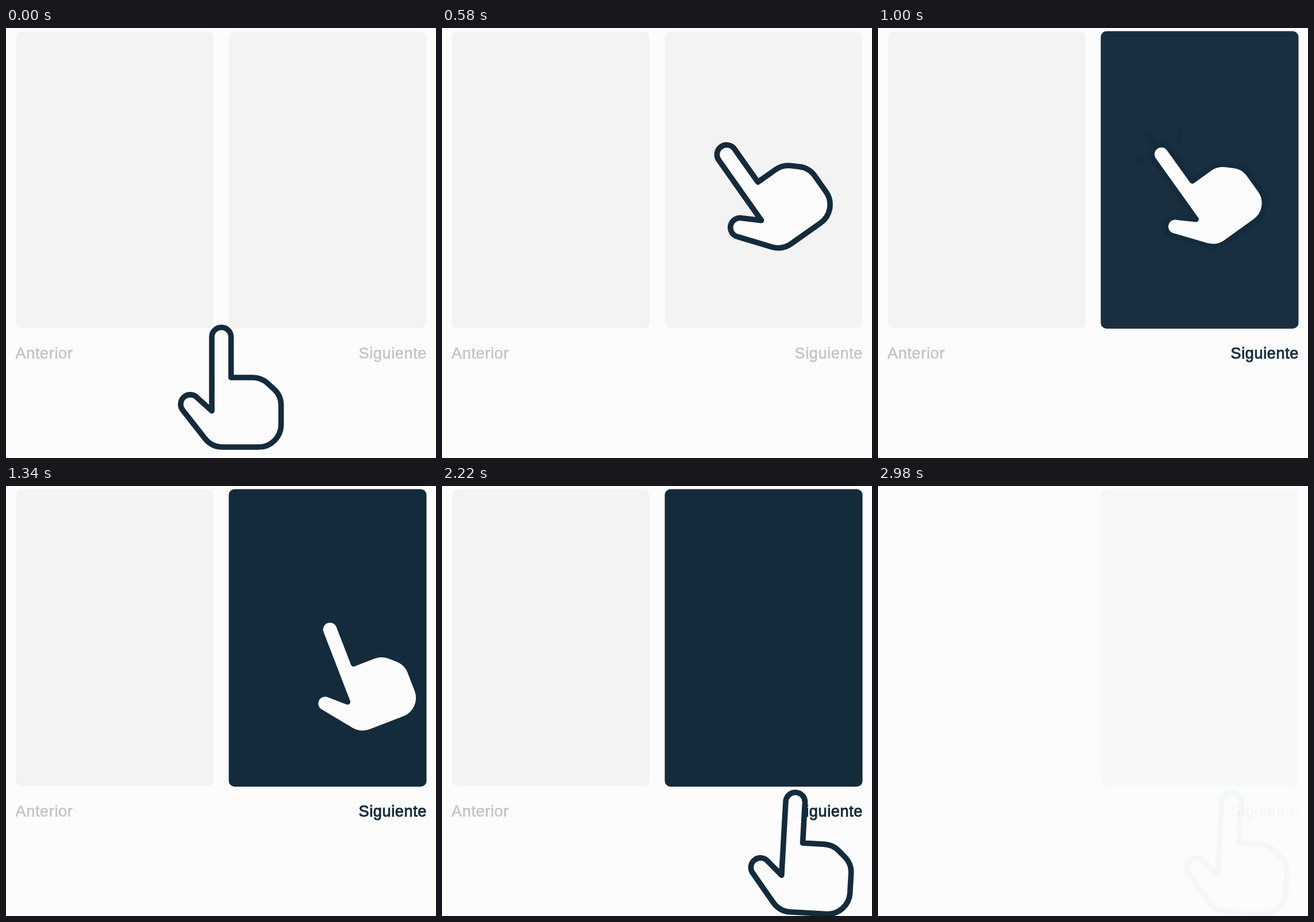
An HTML page that plays this animation: 748 px wide and 748 px high, repeating every 3.14 s.

```html
<!DOCTYPE html>
<html lang="es">
<head>
<meta charset="utf-8">
<title>Anterior / Siguiente</title>
<style>
  html, body { margin: 0; height: 100%; overflow: hidden; background: #fcfcfc; }
  svg { display: block; width: 100%; height: 100%; }
  text { font: 27px "Liberation Sans", Arial, sans-serif; letter-spacing: .65px; stroke: currentColor; stroke-width: .6; }
  text.dark { stroke-width: 1; }
  .light { fill: #f3f3f3; }
  .muted { color: #c4c4c4; fill: currentColor; }
  .dark { color: #142b3b; fill: currentColor; }
  #hand { fill: #fcfcfc; stroke: #142b3b; stroke-width: 9.6; stroke-linecap: round; stroke-linejoin: round; }
</style>
</head>
<body>
<svg viewBox="0 0 748 748">
  <rect class="light fades" x="17" y="6" width="344" height="516" rx="10"/>
  <rect class="light fades" x="388" y="6" width="343" height="516" rx="10"/>
  <rect class="dark active" x="387.5" y="5.5" width="344" height="517.5" rx="10"/>
  <text class="muted fades" x="16.6" y="574.5">Anterior</text>
  <text class="muted idle" x="732" y="574.5" text-anchor="end">Siguiente</text>
  <text class="dark active" x="732" y="574.5" text-anchor="end">Siguiente</text>
  <g id="hand" class="fades">
    <path id="outline" transform="translate(-391 -625)"/>
    <path id="rays" d="M-57.5-105L-48.5-93.7M-12-124L-13-109M32.4-98.5L22-87.5"/>
  </g>
</svg>
<script>
const LOOP = 3140, TILT = -35.6, REST_TILT = 3.2;
const approach = [[391, 625], [695, 502], [588, 389], [558, 279]];
const retreat = [[558, 279], [563, 253], [735, 428], [626, 638]];
const [hand, outline, rays] = ['hand', 'outline', 'rays'].map(id => document.getElementById(id));

const progress = (t, from, to) => Math.min(1, Math.max(0, (t - from) / (to - from)));
const smooth = (t, from, to) => (1 - Math.cos(Math.PI * progress(t, from, to))) / 2;
const setOpacity = (selector, value) =>
  document.querySelectorAll(selector).forEach(el => el.setAttribute('opacity', value));

function bezier(points, p) {
  const q = 1 - p, weights = [q ** 3, 3 * p * q * q, 3 * p * p * q, p ** 3];
  return [0, 1].map(axis => points.reduce((sum, pt, i) => sum + pt[axis] * weights[i], 0));
}

// Pressing shortens the index finger and the thumb; the palm keeps its size.
function handPath(press) {
  const dx = 4 * press, dy = 5 * press;
  return `M358 666V${537.5 + 12 * press}a16.75 16.75 0 0 1 33.5 0V608H429Q444 608 455 618L467 629
    Q478.5 640 478.5 656V690A39 39 0 0 1 439.5 729H377Q358 729 346 714
    L${308 + dx} ${665.5 + dy}a16.5 16.5 0 0 1 25-22Z`;
}

function draw(t) {
  const come = smooth(t, 0, 620);
  const leave = 1 - (1 - progress(t, 1160, 2220)) ** 2.5;
  const press = smooth(t, 640, 820) - smooth(t, 820, 1060);
  const [x, y] = leave > 0 ? bezier(retreat, leave) : bezier(approach, come);
  const angle = TILT * come + (REST_TILT - TILT) * leave;
  hand.setAttribute('transform', `translate(${x - 13 * press} ${y + 8 * press}) rotate(${angle})`);
  outline.setAttribute('d', handPath(press));
  rays.setAttribute('opacity', smooth(t, 640, 760) - smooth(t, 960, 1060));

  const visible = 1 - smooth(Math.min(t, 2980), 2440, 3040);
  const active = smooth(t, 640, 1040);
  setOpacity('.fades', visible);
  setOpacity('.active', active * visible);
  setOpacity('.idle', 1 - active);
}

function tick() {
  draw(performance.now() % LOOP);
  requestAnimationFrame(tick);
}
tick();
</script>
</body>
</html>
```
